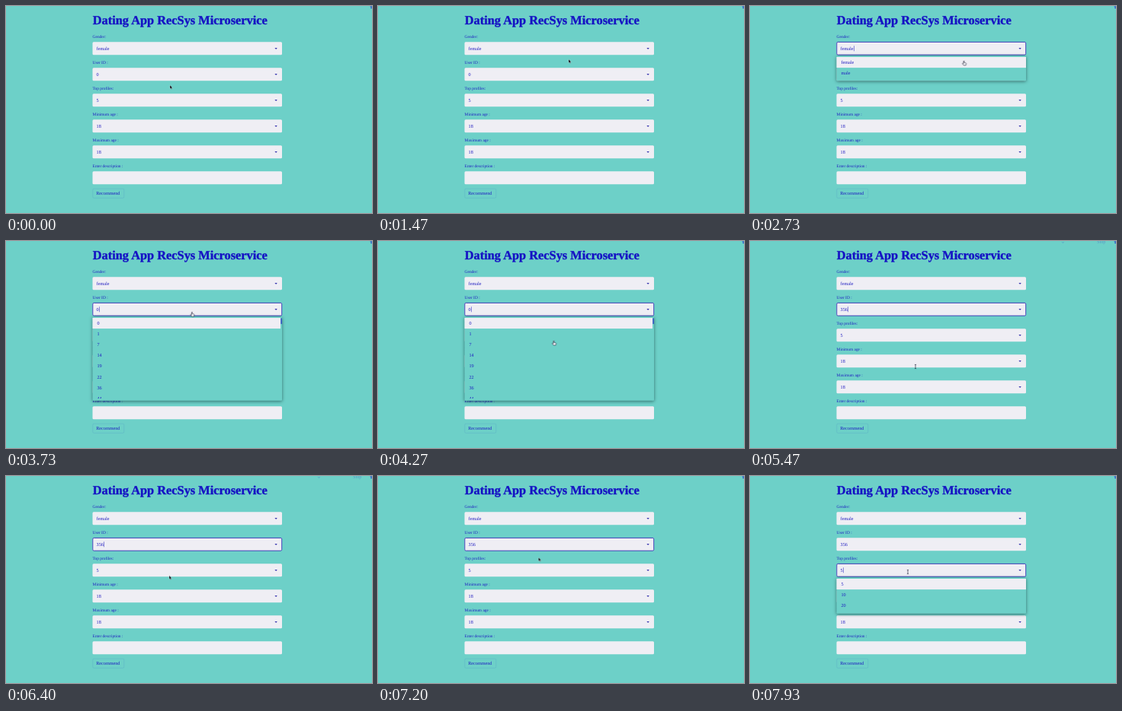
An HTML page for the animation above (8 s loop, 480 px wide and 272 px high).

```html
<!DOCTYPE html>
<html lang="en">
<head>
<meta charset="utf-8">
<title>Recommender form</title>
<style>
  html, body { margin: 0; width: 100%; height: 100%; overflow: hidden; background: #6dd0c8; }
  svg { display: block; width: 480px; height: 272px; }
  text { font: 6.2px "Liberation Serif", serif; fill: #1f1cc0; text-rendering: geometricPrecision; }
  .title { font-size: 16.38px; font-weight: bold; fill: #1512c4; stroke: #1512c4; stroke-width: .35; }
  .label { font-size: 5.4px; }
  .box, .mark { fill: #efeef4; }
  .arrow { fill: #3a38b0; }
  .thumb { fill: #1f1cc0; fill-opacity: .8; }
  .focus { fill: none; stroke: #2824ae; stroke-width: .85; }
  .popup { fill: #6dd0c8; filter: drop-shadow(0 1.2px 2px rgba(0, 25, 30, .55)); }
  .caret { fill: #1f1cc0; animation: blink 1s -.765s step-end infinite; }
  .late { animation-delay: -.465s; }
  .button { fill: none; stroke: #1512c4; stroke-opacity: .13; stroke-width: .6; }
  .on { animation: 8s step-end infinite; opacity: 0; }

  .gender-focus { animation-name: gender-focus; }
  .gender-open { animation-name: gender-open; }
  .user-focus { animation-name: user-focus; }
  .user-open { animation-name: user-open; }
  .user-before { animation-name: user-before; }
  .user-after { animation-name: user-after; }
  .top-focus { animation-name: top-focus; }
  .status { animation-name: status; }
  .pointer { animation-name: pointer; }
  .hand { animation-name: hand; }
  .beam { animation-name: beam; }
  #rows { animation: scroll 8s infinite; }
  .thumb { animation: thumb 8s infinite; }
  #cursor { animation: move 8s ease-in-out infinite; }

  @keyframes blink { 0% { opacity: 1 } 50%, 100% { opacity: 0 } }
  @keyframes gender-focus { 0%, 43.75%, 100% { opacity: 0 } 24.375% { opacity: 1 } }
  @keyframes gender-open { 0%, 36.25%, 100% { opacity: 0 } 24.375% { opacity: 1 } }
  @keyframes user-focus { 0%, 94.125%, 100% { opacity: 0 } 43.75% { opacity: 1 } }
  @keyframes user-open { 0%, 67.5%, 100% { opacity: 0 } 43.75% { opacity: 1 } }
  @keyframes user-before { 0% { opacity: 1 } 67.5%, 100% { opacity: 0 } }
  @keyframes user-after { 0% { opacity: 0 } 67.5%, 100% { opacity: 1 } }
  @keyframes top-focus { 0% { opacity: 0 } 94.125%, 100% { opacity: 1 } }
  @keyframes status { 0%, 46%, 84.1%, 100% { opacity: 0 } 37%, 67.8% { opacity: .3 } }
  @keyframes pointer {
    0%, 37.5%, 55.6%, 76.5% { opacity: 1 }
    21.5%, 40.6%, 64.4%, 93%, 100% { opacity: 0 }
  }
  @keyframes hand {
    0%, 37.5%, 55.6%, 67.5%, 100% { opacity: 0 }
    25.5%, 45.6%, 64.4% { opacity: 1 }
  }
  @keyframes beam {
    0%, 25.5%, 45.6%, 76.5% { opacity: 0 }
    21.5%, 40.6%, 67.5%, 93%, 100% { opacity: 1 }
  }
  @keyframes scroll {
    0%, 54.375% { transform: translateY(0); animation-timing-function: linear }
    60% { transform: translateY(-589.4px); animation-timing-function: ease-out }
    64.4%, 100% { transform: translateY(-718px) }
  }
  @keyframes thumb {
    0%, 54.375% { transform: translateY(0); animation-timing-function: linear }
    60% { transform: translateY(41px); animation-timing-function: ease-out }
    64.4%, 100% { transform: translateY(50px) }
  }
  @keyframes move {
    0% { transform: translate(215px, 104px) }
    10.9%, 18.4% { transform: translate(250px, 70px) }
    23.5%, 24.5% { transform: translate(262px, 57px) }
    28.4%, 36.25% { transform: translate(280.5px, 72px) }
    42.5%, 45% { transform: translate(245px, 90px) }
    53.375%, 54.4% { transform: translate(230.5px, 131px) }
    60% { transform: translate(213.5px, 177px) }
    64.4%, 73.4% { transform: translate(217px, 165px) }
    83.4%, 85.9% { transform: translate(213px, 120px) }
    90% { transform: translate(210.5px, 107px) }
    94.5% { transform: translate(207px, 124px) }
    99.1%, 100% { transform: translate(207px, 126px) }
  }
</style>
</head>
<body>
<svg viewBox="0 0 480 272">
  <defs><clipPath id="view"><rect x="113.5" y="100" width="249" height="106.5"/></clipPath></defs>
  <text class="title" x="113.7" y="24.3">Dating App RecSys Microservice</text>
  <path d="M477.7 .8h2.3M478.2 2.6h1.8" stroke="#1512c4" stroke-width=".8"/>
  <g class="on status">
    <path d="M409 1.2l1.5 1.5 1-1.7" fill="none" stroke="#1512c4" stroke-width=".7"/>
    <text x="455" y="2.6">Stop</text>
  </g>
  <g id="form"></g>
  <rect class="button" x="113.8" y="240.1" width="41" height="12.2" rx="1.5"/>
  <text x="118.2" y="248.1">Recommend</text>
  <g id="popups"></g>
  <g id="cursor">
    <path class="on pointer" d="M0 0v4.7l1.1-1 .8 1.8.9-.4-.8-1.7h1.5z" fill="#0b0b14" stroke="#e8f4f4" stroke-width=".3"/>
    <path class="on hand" d="M-.5 .4q.6-.7 1.1 0v2l2 .5q.6.3.4 1.2l-.5 1.9h-2.7l-1.9-2.4q.2-.8 1.6.1z" fill="#f4f4f8" stroke="#14142a" stroke-width=".55"/>
    <path class="on beam" d="M-1.1-2.7q1.1 0 1.1.7 0-.7 1.1-.7M0-2v4M-1.1 2.7q1.1 0 1.1-.7 0 .7 1.1.7" fill="none" stroke="#14142a" stroke-width=".6"/>
  </g>
</svg>
<script>
  const form = document.getElementById('form');
  const popups = document.getElementById('popups');
  const firstY = 47.3, pitch = 34, rowH = 14.1;

  const fieldY = i => firstY + i * pitch;
  const rect = (cls, x, y, w, h, r = 0) =>
    `<rect class="${cls}" x="${x}" y="${y}" width="${w}" height="${h}" rx="${r}"/>`;
  const text = (cls, x, y, s) => `<text class="${cls}" x="${x}" y="${y}">${s}</text>`;
  const rows = (items, y) => items.map((s, i) => text('', 119.5, y + 8.7 + i * rowH, s)).join('');

  function field(i, label, ...values) {
    const y = fieldY(i);
    const states = values.length > 1 ? ['on user-before', 'on user-after'] : [''];
    form.innerHTML += text('label', 113.6, y - 5.6, label) + rect('box', 113.5, y, 248.5, 17, 1.5);
    if (!values.length) return;
    form.innerHTML += values.map((v, k) => text(states[k], 118.6, y + 10.5, v)).join('') +
      `<path class="arrow" d="M352.4 ${y + 7.8}h3.4l-1.7 1.9z"/>`;
  }

  function focus(i, name, carets, blink = '') {
    const y = fieldY(i);
    form.innerHTML += `<g class="on ${name}-focus">` + rect('focus', 113.8, y + .1, 247.9, 16.8, 1.5) +
      carets.map(([x, cls]) => `<g class="${cls}">${rect('caret ' + blink, x, y + 5, .5, 7)}</g>`).join('') + '</g>';
  }

  function popup(i, name, items, height, long) {
    const y = fieldY(i) + 20;
    const list = rect('mark', 113.5, y - .3, long ? 246.5 : 248.5, rowH) + rows(items, y);
    popups.innerHTML += `<g class="on ${name}">` + rect('popup', 113.5, y - 1.6, 248.5, height, 1) +
      (long ? `<g clip-path="url(#view)"><g id="rows">${list}</g></g>` + rect('thumb', 360.4, y, 1.4, 8, .7) : list) + '</g>';
  }

  // User ids climb by about 6.5 with a little wobble.
  const climb = (from, count) => Array.from({ length: count }, (_, i) =>
    Math.round(from + (i + 1) * 6.52 + 1.8 * Math.sin(i * 2.3)));
  const users = [0, 1, 7, 14, 19, 22, 36, 44, ...climb(37, 34),
    267, 278, 281, 283, 298, 300, 304, ...climb(304, 6), 356, ...climb(356, 14)];

  field(0, 'Gender:', 'female');
  field(1, 'User ID :', 0, 356);
  field(2, 'Top profiles:', 5);
  field(3, 'Minimum age :', 18);
  field(4, 'Maximum age :', 18);
  field(5, 'Enter description :');
  focus(0, 'gender', [[136.3, '']]);
  focus(1, 'user', [[122.3, 'on user-before'], [128.3, 'on user-after']]);
  focus(2, 'top', [[122.3, '']], 'late');
  popup(0, 'gender-open', ['female', 'male'], 32.5);
  popup(1, 'user-open', users, 110, true);
  popup(2, 'top-focus', [5, 10, 20], 47);
</script>
</body>
</html>
```
